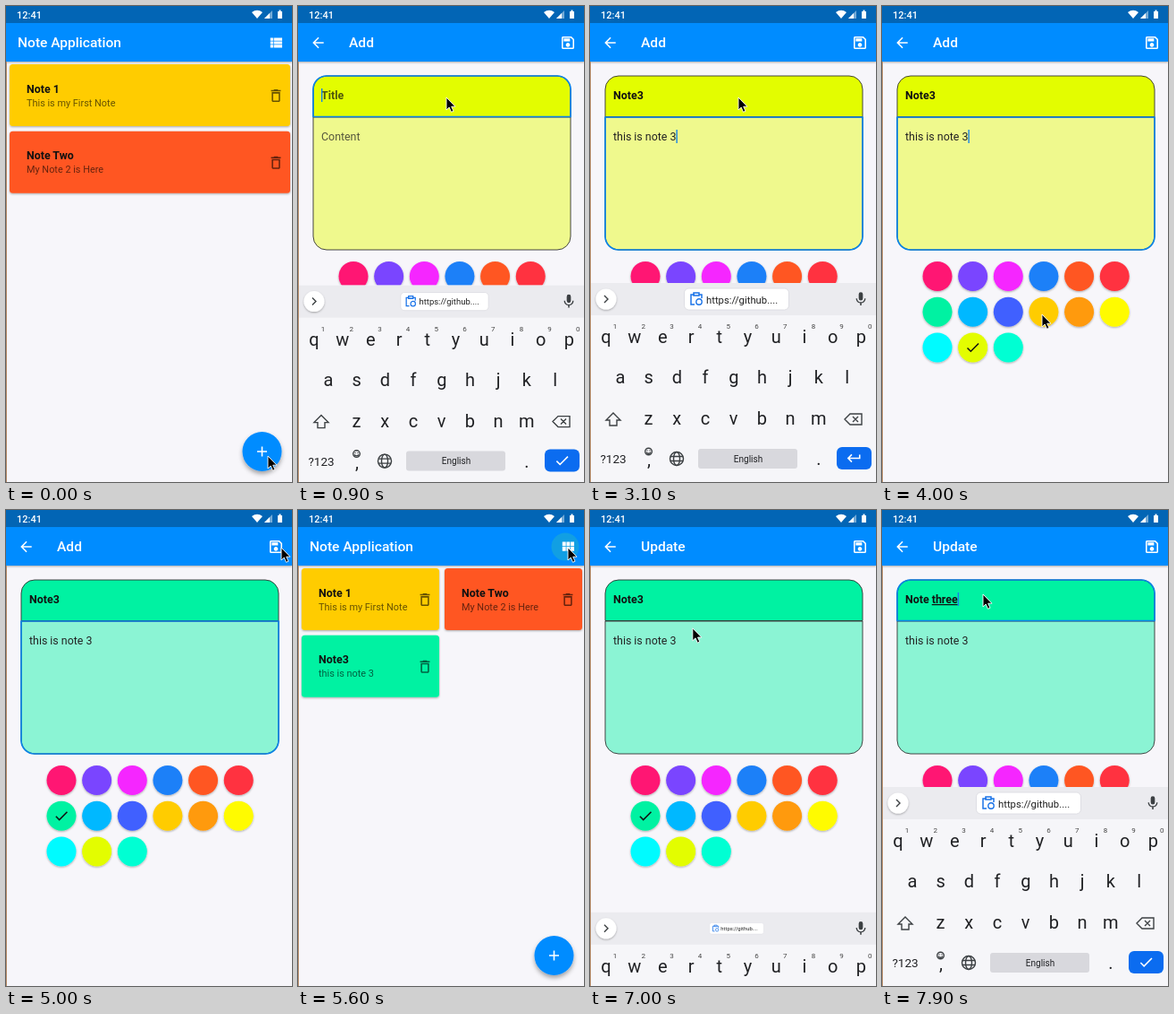
Write an HTML page that moves like this. It is 320 by 531 pixels and loops after 8000 ms.

```html
<!DOCTYPE html>
<html lang="en">
<head>
<meta charset="utf-8">
<title>Note Application</title>
<style>
html, body { margin: 0; width: 100%; height: 100%; overflow: hidden; background: #f7f6fa; }
svg { display: block; width: 320px; height: 531px; }
text { font-family: Roboto, "Noto Sans", sans-serif; white-space: pre; }
.bar { font-size: 15.56px; font-weight: 500; fill: #fff; }
.head { font-size: 12.4px; font-weight: 700; fill: #111; }
.sub { font-size: 10.9px; fill: #000; fill-opacity: .6; }
.body { font-size: 12.4px; fill: #222; }
.key { font-size: 20px; fill: #202124; text-anchor: middle; }
.digit { font-size: 8px; fill: #444; text-anchor: middle; }
.line { fill: none; stroke: #3c4043; stroke-width: 1.4; }
</style>
</head>
<body>
<svg id="stage" viewBox="0 0 320 531"></svg>
<script>
const LOOP = 8000, STEP = 100;
const BLUE = '#008cff', PAGE = '#f7f6fa', GREEN = '#00f2a2', LIME = '#e3fd00', AMBER = '#ffcc00', ORANGE = '#ff5722';
const SWATCHES = ['#ff1573', '#7a44ff', '#f525ff', '#1e80f8', ORANGE, '#ff3340',
  GREEN, '#00b8ff', '#4161ff', AMBER, '#ff9a0c', '#fffb00', '#00fbff', LIME, '#00ffd3'];
const NOTES = [['Note 1', 'This is my First Note', AMBER], ['Note Two', 'My Note 2 is Here', ORANGE], ['Note3', 'this is note 3', GREEN]];
const ICON = {
  list: 'M4 14h4v-4H4v4zm0 5h4v-4H4v4zM4 9h4V5H4v4zm5 5h12v-4H9v4zm0 5h12v-4H9v4zM9 5v4h12V5H9z',
  grid: 'M4 11h5V5H4v6zm0 7h5v-6H4v6zm6 0h5v-6h-5v6zm6 0h5v-6h-5v6zm-6-7h5V5h-5v6zm6-6v6h5V5h-5z',
  save: 'M17 3H5c-1.11 0-2 .9-2 2v14c0 1.1.89 2 2 2h14c1.1 0 2-.9 2-2V7l-4-4zm2 16H5V5h11.17L19 7.83V19zm-7-7c-1.66 0-3 1.34-3 3s1.34 3 3 3 3-1.34 3-3-1.34-3-3-3zM6 6h9v4H6z',
  back: 'M20 11H7.83l5.59-5.59L12 4l-8 8 8 8 1.41-1.41L7.83 13H20v-2z',
  trash: 'M16 9v10H8V9h8m-1.5-6h-5l-1 1H5v2h14V4h-3.5l-1-1zM18 7H6v12c0 1.1.9 2 2 2h8c1.1 0 2-.9 2-2V7z',
  check: 'M9 16.17L4.83 12l-1.42 1.41L9 19 21 7l-1.41-1.41z',
  enter: 'M19 7v4H5.83l3.58-3.59L8 6l-6 6 6 6 1.41-1.41L5.83 13H21V7z',
  mic: 'M12 14a3 3 0 0 0 3-3V5a3 3 0 0 0-6 0v6a3 3 0 0 0 3 3zm5.3-3a5.3 5.3 0 0 1-10.6 0H5a7 7 0 0 0 6 6.7V21h2v-3.3A7 7 0 0 0 19 11z'
};

// An icon on a 24 unit grid, centred on x, y.
const icon = (name, x, y, fill = '#fff', id = '', size = 18.67) =>
  `<path ${id && `id="${id}"`} d="${ICON[name]}" fill="${fill}" transform="translate(${x} ${y}) scale(${size / 24}) translate(-12 -12)"/>`;
const text = (cls, x, y, str, more = '') => `<text class="${cls}" x="${x}" y="${y}" ${more}>${str}</text>`;
const rect = (x, y, w, h, fill, more = '') => `<rect x="${x}" y="${y}" width="${w}" height="${h}" fill="${fill}" ${more}/>`;
const appBar = () => rect(0, 0, 320, 62, BLUE, 'filter="url(#drop)"');

const swatchAt = i => [62 + i % 6 * 39.65, 301.5 + Math.floor(i / 6) * 39.7];

const listPage = () => `<g id="list">${rect(0, 0, 320, 531, PAGE)}${appBar()}
  <circle id="ripple" cx="299" cy="41" r="23" fill="#1cabd0" opacity=".6" clip-path="url(#barClip)"/>
  ${text('bar', 13, 46, 'Note Application')}${icon('list', 302, 41, '#fff', 'viewIcon')}
  ${NOTES.map(([head, sub, fill], i) => `<g id="card${i}">${rect(0, 0, 314, 69, fill, 'rx="3.5" filter="url(#drop)"')}
    ${text('head', 19, 31.5, head)}${text('sub', 19, 46.5, sub)}<g>${icon('trash', 0, 35, '#00000099')}</g></g>`).join('')}
  <circle cx="286.5" cy="497" r="22" fill="${BLUE}" filter="url(#lift)"/>
  <path d="M281 497h11M286.500 491.500v11" stroke="#fff" stroke-width="1.6"/></g>`;

const editorPage = () => `<g id="editor">${rect(0, 0, 320, 531, PAGE)}${appBar()}
  ${icon('back', 22.5, 41)}${text('bar', 57, 46, 'Add', 'id="heading"')}${icon('save', 302, 41)}
  <path id="contentBox" d="M17 124H305V257A15 15 0 0 1 290 272H32A15 15 0 0 1 17 257Z" fill-opacity=".44"/>
  <path id="titleBox" d="M17 123.500V93A15 15 0 0 1 32 78H290A15 15 0 0 1 305 93V123.500Z"/>
  <use id="focusBox" fill="none"/>
  ${text('head', 26, 104, '', 'id="title"')}${text('body', 26, 150, '', 'id="content"')}
  ${rect(0, 0, 1.4, 15, '#1683e8', 'id="caret"')}
  ${SWATCHES.map((fill, i) => { const [x, y] = swatchAt(i); return `<circle cx="${x}" cy="${y}" r="16.5" fill="${fill}" filter="url(#drop)"/>`; }).join('')}
  <g id="tick">${icon('check', 0, 0, '#111')}</g></g>`;

const keyRow = (keys, x, y) => [...keys].map((k, i) => text('key', x + i * 31.7, y, k)).join('');

const keyboard = () => `<g id="keyboard">${rect(0, 309, 320, 222, '#f6f6f9')}${rect(0, 309, 320, 36, '#ebebef')}
  <circle cx="18" cy="327" r="11.5" fill="#fff" filter="url(#drop)"/><path class="line" d="M16 323l4 4-4 4"/>
  <g id="chip">${rect(-58.5, -12, 117, 24, '#fff', 'rx="5" stroke="#d8d8df" stroke-width=".8"')}
    <path d="M-47-5h-4v11h4M-42-5h3v4M-48-7h6v3h-6z" fill="none" stroke="#1a73e8" stroke-width="1.5"/>
    <circle cx="-42" cy="3" r="3.200" fill="none" stroke="#1a73e8" stroke-width="1.4"/>
    ${text('body', -34, 4.5, 'https://github....', 'style="font-size:11.3px"')}</g>
  ${icon('mic', 303, 327, '#3c4043')}
  ${keyRow('qwertyuiop', 18, 376)}${keyRow('asdfghjkl', 34, 421)}${keyRow('zxcvbnm', 65.5, 467)}
  ${[...'1234567890'].map((d, i) => text('digit', 28 + i * 31.7, 360, d)).join('')}
  <path class="line" d="M26 454l8 8h-4v6h-8v-6h-4z"/>
  <path class="line" d="M291 455h13v12h-13l-6-6zM294 458l6 6m0-6l-6 6"/>
  ${text('key', 26, 510, '?123', 'style="font-size:13.5px"')}${text('key', 66, 513, ',')}${text('key', 256, 512, '.')}
  <g class="line" stroke-width="1"><circle cx="65.500" cy="497" r="3.800"/><path d="M63 498q2.500 2.500 5 0M64 495.500v1M67 495.500v1"/>
    <circle cx="97" cy="505" r="7.500"/><ellipse cx="97" cy="505" rx="3.500" ry="7.500"/><path d="M90 502.500h14M90 507.500h14"/></g>
  ${rect(121, 494, 111, 22, '#d8d8dd', 'rx="3"')}${text('key', 177, 508.5, 'English', 'style="font-size:10px"')}
  ${rect(276, 492, 39, 25, '#0b6cf0', 'rx="6"')}${icon('check', 295.5, 504.5, '#fff', 'actionIcon')}</g>`;

document.getElementById('stage').innerHTML = `<defs>
  <filter id="drop" x="-10%" y="-10%" width="120%" height="130%"><feDropShadow dx="0" dy="1" stdDeviation="1.1" flood-opacity=".32"/></filter>
  <filter id="lift" x="-30%" y="-30%" width="160%" height="170%"><feDropShadow dx="0" dy="3" stdDeviation="2.6" flood-opacity=".35"/></filter>
  <clipPath id="barClip"><rect y="19" width="320" height="43"/></clipPath></defs>
  ${listPage()}${editorPage()}${keyboard()}
  ${rect(0, 0, 320, 19, '#0265b5')}${text('bar', 12, 13.5, '12:41', 'style="font-size:11px"')}
  <path d="M281 14L275 7Q281 2.500 287 7ZM304 6h1.500V4.500h2V6H309v8h-5z" fill="#fff"/>
  <path d="M298 5v9h-9z" fill="#fff" opacity=".45"/><path d="M295 8v6h-6z" fill="#fff"/>
  ${rect(0, 62, 1, 469, '#b58a66')}
  <path id="mouse" d="M0 0V14L3.200 11 5.500 16.300 8 15.200 5.700 10.200H10Z" fill="#000" stroke="#fff" stroke-width=".9"/>`;

const el = id => document.getElementById(id);
const set = (id, attrs) => { for (const k in attrs) el(id).setAttribute(k, attrs[k]); };
const show = (id, on) => set(id, { visibility: on ? 'visible' : 'hidden' });
const progress = (t, from, to) => Math.min(1, Math.max(0, (t - from) / (to - from)));
const easeOut = p => 1 - (1 - p) ** 3;
const smooth = p => p * p * (3 - 2 * p);
const typed = (str, t, from, to) => str.slice(0, Math.round(progress(t, from, to) * str.length));

// Pointer stops: [leave, arrive, x, y].
const MOVES = [[0, 0, 293, 502], [300, 700, 166, 102], [3400, 3900, 179, 344], [4200, 4500, 62, 342],
  [4600, 5000, 308, 42], [5200, 5500, 302, 42], [6200, 6600, 120, 240], [6800, 7100, 113, 94]];
function pointer(t) {
  return MOVES.reduce(([x, y], [from, to, nx, ny]) => {
    const p = t < from ? 0 : to === from ? 1 : smooth(progress(t, from, to));
    return [x + (nx - x) * p, y + (ny - y) * p];
  }, [293, 502]);
}

function writeField(id, str, composing) {
  const word = composing ? (str.match(/[a-z]+$/i) || [''])[0] : '';
  el(id).innerHTML = str.slice(0, str.length - word.length) + (word && `<tspan text-decoration="underline">${word}</tspan>`);
}

function drawList(t) {
  const grid = t >= 5600 && t < 6000;
  NOTES.forEach((_, i) => {
    const card = el('card' + i), x = grid ? 4 + i % 2 * 160 : 4, row = grid ? i >> 1 : i;
    card.setAttribute('transform', `translate(${x} ${65 + row * 74.7})`);
    card.querySelector('rect').setAttribute('width', grid ? 154 : 314);
    card.querySelector('g').setAttribute('transform', `translate(${grid ? 138 : 298})`);
  });
  show('card2', t >= 5100);
  set('viewIcon', { d: ICON[grid ? 'grid' : 'list'] });
  const start = t < 5900 ? 5500 : 5900, p = progress(t, start, start + 300);
  set('ripple', { r: 8 + 15 * Math.min(1, p * 1.5), opacity: p > 0 && p < 1 ? .6 : 0 });
}

function drawEditor(t) {
  const updating = t >= 6000;
  const opening = updating ? progress(t, 6600, 6900) : progress(t, 100, 400);
  const closing = updating ? 0 : progress(t, 5100, 5400);
  const shown = easeOut(opening) * (1 - closing);
  show('editor', shown > 0);
  set('editor', { opacity: shown, transform: `translate(0 ${60 * (1 - easeOut(opening)) + 50 * closing ** 2})` });
  el('heading').textContent = updating ? 'Update' : 'Add';

  const pick = updating || t >= 4600 ? 6 : t >= 4100 ? 9 : 13;
  set('tick', { transform: `translate(${swatchAt(pick)})` });
  const inContent = !updating && t >= 2000, inTitle = !inContent && (updating ? t >= 7100 : t >= 600);
  set('titleBox', { fill: SWATCHES[pick], stroke: '#333', 'stroke-width': .9 });
  set('contentBox', { fill: SWATCHES[pick], stroke: '#333', 'stroke-width': .9 });

  const title = !updating ? typed('Note3', t, 1100, 1800) : t < 7200 ? 'Note3' : 'Note' + typed(' three', t, 7200, 7800);
  const content = updating ? 'this is note 3' : typed('this is note 3', t, 2100, 3000);
  writeField('title', title || 'Title', title && inTitle);
  writeField('content', content || 'Content', content && inContent && t < 3200);
  set('title', { 'fill-opacity': title ? 1 : .7 });
  set('content', { 'fill-opacity': content ? 1 : .75 });

  const field = inContent ? 'content' : 'title', value = inContent ? content : title;
  const outline = el(field + 'Box').getAttribute('d');
  let focus = el('focusBox');
  if (focus.tagName !== 'path') {
    focus.outerHTML = '<path id="focusBox" fill="none" stroke="#0b84e6" stroke-width="1.700"/>';
  }
  set('focusBox', { d: outline });
  const focused = shown > 0 && (inTitle || inContent);
  show('focusBox', focused);
  const blinkOn = !inContent || t < 3000 || (t - 3000) % 800 < 400;
  show('caret', focused && blinkOn);
  set('caret', { x: 26 + (value ? el(field).getComputedTextLength() : 0), y: inContent ? 138 : 92 });
}

function drawKeyboard(t) {
  const up = t < 6000 ? easeOut(progress(t, 560, 1000)) * (1 - smooth(progress(t, 3200, 3500)))
    : easeOut(progress(t, 6950, 7300));
  show('keyboard', up > 0);
  set('keyboard', { transform: `translate(0 ${222 * (1 - up)})` });
  const pop = t < 6000 ? progress(t, 700, 1000) : progress(t, 7000, 7300);
  set('chip', { transform: `translate(164 327) scale(${.52 + .48 * pop})` });
  set('actionIcon', { d: ICON[t >= 2000 && t < 6000 ? 'enter' : 'check'] });
}

function draw(t) {
  drawList(t);
  drawEditor(t);
  drawKeyboard(t);
  set('mouse', { transform: `translate(${pointer(t)})` });
}

const begin = performance.now();
function tick(now) {
  const t = Math.max(0, now - begin) % LOOP;
  draw(Math.floor(t / STEP) * STEP);
  requestAnimationFrame(tick);
}
draw(0);
requestAnimationFrame(tick);
</script>
</body>
</html>
```
